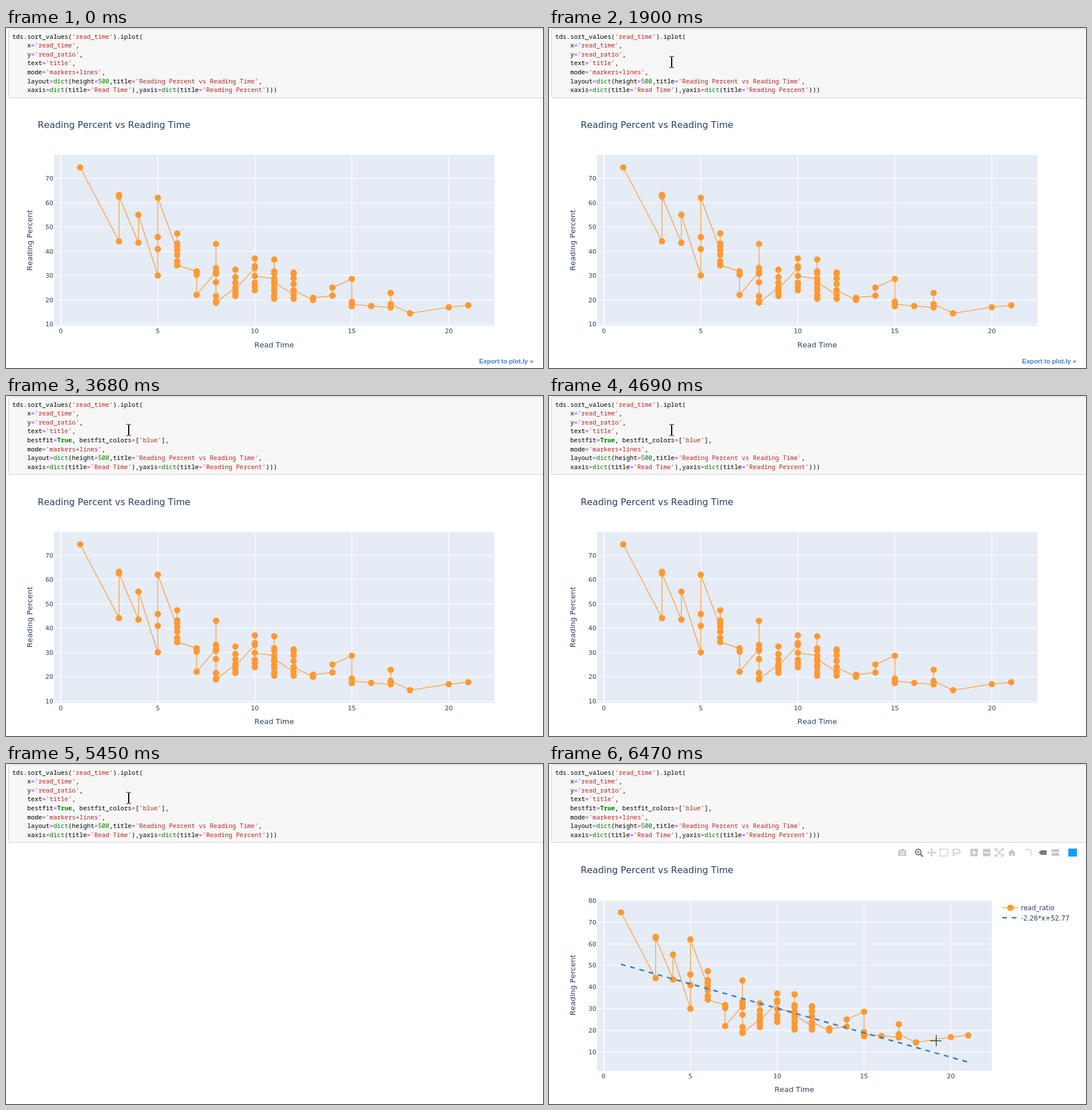
An HTML page with a canvas that plays this animation: 941x595 px, repeating every 6.55 s.

```html
<!DOCTYPE html>
<html lang="en">
<head>
<meta charset="utf-8">
<title>Notebook chart</title>
<style>
html, body { margin: 0; width: 100%; height: 100%; overflow: hidden; background: #fff; }
canvas { display: block; }
</style>
</head>
<body>
<canvas id="stage" width="941" height="595"></canvas>
<script>
const c = document.getElementById('stage').getContext('2d');
const LOOP = 6550, SHIFT = 15.5, LINE = 15.56;
const SANS = '"DejaVu Sans", Verdana, sans-serif';
const ARIAL = '"Liberation Sans", Arial, sans-serif';
const MONO = '"Noto Sans Mono", "Liberation Mono", monospace';
const INK = '#2a3f5f', ORANGE = '#ff9933', BLUE = '#3780bf', PLOT = '#e5ecf6';
c.fontKerning = 'none';

// read time -> reading percents, in drawing order
const data = {
  1: [74.5], 3: [44.1, 63.2, 62.5], 4: [43.5, 55], 5: [30, 40.9, 45.8, 62],
  6: [40.4, 47.3, 43.2, 42, 38.5, 35.9, 34.2], 7: [31.7, 30.3, 22],
  8: [31.4, 43, 33.1, 30.7, 27.2, 21.5, 19.3, 18.8],
  9: [25, 32.4, 29.3, 27, 23, 21.5, 24.4],
  10: [33, 37, 33.8, 27, 25.5, 23.9, 29.8],
  11: [28.6, 36.6, 31.7, 30.7, 26.5, 24.6, 23.7, 21.8, 20.4, 27.2],
  12: [22, 31.2, 30.7, 28.8, 26.5, 20.4, 23.9], 13: [19.9, 20.8],
  14: [21.7, 25], 15: [28.6, 19.2, 17.3, 18.2], 16: [17.4],
  17: [16.8, 22.8, 18.2], 18: [14.4], 20: [16.9], 21: [17.7]
};
const points = Object.entries(data).flatMap(([x, ys]) => ys.map(y => [+x, y]));

const head = ["tds.sort_values('read_time').iplot(", "    x='read_time',", "    y='read_ratio',", "    text='title',"];
const tail = ["    mode='markers+lines',",
  "    layout=dict(height=500,title='Reading Percent vs Reading Time',",
  "    xaxis=dict(title='Read Time'),yaxis=dict(title='Reading Percent')))"];
const added = "    bestfit=True, bestfit_colors=['blue'],";
const logCode = ["layout = dict(", "    xaxis=dict(type='log', title='Word Count'),",
  "    yaxis=dict(title='views'),", "    title='Views vs Word Count Log Axis')", "",
  "tds.sort_values('word_count').iplot(", "    x='word_count',", "    y='views',",
  "    layout=layout,", "    text='title',", "    mode='markers',", "    bestfit=True,",
  "    bestfit_colors=['blue'])"];

function box(x, y, w, h, color) {
  c.fillStyle = color;
  c.fillRect(x, y, w, h);
}

function write(str, x, baseline, font, color, align = 'left') {
  c.font = font;
  c.textAlign = align;
  c.fillStyle = color;
  c.fillText(str, x, baseline);
}

// chart text, vertically centred on its capitals
function label(str, x, y, size, align) {
  write(str, x, y + size * 0.365, `${size}px ${SANS}`, INK, align);
}

function dot(x, y, r = 5.6, color = ORANGE) {
  c.fillStyle = color;
  c.beginPath();
  c.arc(x, y, r, 0, 7);
  c.fill();
}

function path(pts, color, width, dash = []) {
  c.strokeStyle = color;
  c.lineWidth = width;
  c.setLineDash(dash);
  c.beginPath();
  pts.forEach(p => c.lineTo(...p));
  c.stroke();
  c.setLineDash([]);
}

const dashed = (...pts) => path(pts, BLUE, 2.7, [8.4, 8.4]);

function tokenColor(s) {
  if (s[0] === "'") return '#ba2121';
  if (s === '=') return '#aa22ff';
  return /^(dict|type|True|\d+)$/.test(s) ? '#008000' : '#000';
}

function cell(lines, top) {
  c.beginPath();
  c.roundRect(4.5, top + 0.5, 950, Math.round(lines.length * LINE + 12), 2);
  c.fillStyle = '#f7f7f7';
  c.fill();
  c.strokeStyle = '#cfcfcf';
  c.lineWidth = 1;
  c.stroke();
  lines.forEach((line, i) => {
    let x = 11;
    for (const s of line.match(/'[^']*'|\w+|=|[^\w'=]+/g) || []) {
      const weight = s === 'True' ? 'bold' : 'normal';
      write(s, x, top + 17.8 + i * LINE, `${weight} 10.9px ${MONO}`, tokenColor(s));
      x += c.measureText(s).width;
    }
  });
}

function chart(dy, fit) {
  const right = fit ? 776 : 856, top = Math.round(222 + dy), bottom = Math.round(521 + dy);
  const X = v => fit ? 95.6 + v * 30.43 : 96 + v * 34;
  const Y = v => dy + (fit ? 488.5 - (v - 10) * 3.79 : 518 - (v - 10) * 4.247);
  box(84, top, right - 84, bottom - top, PLOT);
  for (let v = 0; v <= 20; v += 5) {
    box(Math.round(X(v)) - (v ? 0.7 : 1), top, v ? 1.3 : 2, bottom - top, '#fff');
    label(v, X(v), 530 + dy, 11, 'center');
  }
  for (let v = 10; v <= (fit ? 80 : 70); v += 10) {
    box(84, Math.round(Y(v)) - 0.6, right - 84, 1.2, '#fff');
    label(v, 83, Y(v), 11, 'right');
  }
  const pts = points.map(([x, y]) => [X(x), Y(y)]);
  path(pts, ORANGE, 1.3);
  pts.forEach(p => dot(...p));
  if (fit) {
    dashed([X(1), Y(50.51)], [X(21), Y(5.31)]);
    path([[794, 251.5], [822, 251.5]], ORANGE, 1.3);
    dot(808.5, 251.5);
    label('read_ratio', 827, 251.5, 11.55);
    dashed([794, 269], [821, 269]);
    label('-2.26*x+52.77', 827, 269.5, 11.55);
  }
  label('Reading Percent vs Reading Time', 55.5, 169.5 + dy, 15.85);
  label('Read Time', (84 + right) / 2, 554 + dy, 12.95, 'center');
  c.save();
  c.translate(41.5, 371.5 + dy);
  c.rotate(-Math.PI / 2);
  label('Reading Percent', 0, 0, 12.95, 'center');
  c.restore();
  write('Export to plot.ly »', 829, 587 + dy, `bold 11.25px ${ARIAL}`, '#447adb');
}

function logSection() {
  box(0, 143, 941, 1, '#aaa');
  write('Log Scale', 9.5, 186, `bold 20.5px ${ARIAL}`, '#000');
  cell(logCode, 207);
  label('Views vs Word Count Log Axis', 55.5, 468.5, 15.85);
  box(84, 521, 684, 74, PLOT);
  for (let v = 2; v <= 15; v++) {
    const n = v < 10 ? v / 10 : v - 9;
    box(Math.round(440 + 399 * Math.log10(n)) - 0.5, 521, 1, 74, '#fff');
  }
  [['160k', 547], ['140k', 581]].forEach(([s, y]) => {
    box(84, y - 0.5, 684, 1, '#fff');
    label(s, 83, y, 11, 'right');
  });
  dot(700, 544);
  dot(800, 534.5);
  label('views', 819, 535, 11.55);
  dashed([786, 552], [812, 552]);
  label('9.81*x+9818.69', 819, 553, 11.55);
}

function modebar(y) {
  const pale = '#c7c7c7', dark = '#7c7c7c';
  const ring = (x, y, rx, ry, color, w) => {
    c.strokeStyle = color;
    c.lineWidth = w;
    c.beginPath();
    c.ellipse(x, y, rx, ry, 0, 0, 7);
    c.stroke();
  };
  const shape = (pts, color) => {
    c.fillStyle = color;
    c.beginPath();
    pts.forEach(p => c.lineTo(...p));
    c.fill();
  };
  c.save();
  c.translate(0, y);
  // camera
  box(612, -4, 14, 10, pale);
  box(616, -6, 6, 3, pale);
  dot(619, 1, 3.6, '#fff');
  dot(619, 1, 2.2, pale);
  // zoom
  ring(647, -1, 4.8, 4.8, dark, 2.2);
  path([[650, 2], [655, 7]], dark, 2.6);
  path([[644.5, -1], [649.5, -1]], dark, 1.4);
  path([[647, -3.5], [647, 1.5]], dark, 1.4);
  // pan
  path([[664, 0], [677, 0]], pale, 1.5);
  path([[670.5, -6], [670.5, 6]], pale, 1.5);
  for (let i = 0; i < 4; i++) {
    c.save();
    c.translate(670.5, 0);
    c.rotate(i * Math.PI / 2);
    shape([[7.5, 0], [4.5, -3], [4.5, 3]], pale);
    c.restore();
  }
  // box select, lasso
  c.setLineDash([2.4, 1.6]);
  c.strokeStyle = pale;
  c.lineWidth = 2;
  c.strokeRect(685.5, -6, 13, 12);
  c.setLineDash([]);
  ring(714, -2, 6.5, 4, pale, 1.7);
  path([[709, 1], [708, 4], [711, 6]], pale, 1.6);
  // zoom in, zoom out
  [745, 767].forEach((x, i) => {
    box(x - 6.5, -6.5, 13, 13, pale);
    box(x - 4, -1, 8, 2, '#fff');
    if (!i) box(x - 1, -4, 2, 8, '#fff');
  });
  // autoscale
  path([[783, -6], [795, 6]], pale, 1.6);
  path([[795, -6], [783, 6]], pale, 1.6);
  [-1, 1].forEach(a => [-1, 1].forEach(b =>
    path([[789 + a * 3, b * 6.5], [789 + a * 7, b * 6.5], [789 + a * 7, b * 3]], pale, 1.6)));
  // home
  shape([[804, 0.5], [811, -6], [818, 0.5]], pale);
  box(806, 0, 10, 6, pale);
  box(810, 2, 2.5, 4, '#f7f7f7');
  // spikes, closest, compare
  path([[835, -5], [845, -5]], pale, 1.8, [2.5, 1.5]);
  path([[845, -3], [845, 6]], pale, 1.8, [2.5, 1.5]);
  shape([[858, 0], [862, -4], [872, -4], [872, 4], [862, 4]], dark);
  [-3.2, 3.2].forEach(v => shape([[879, v], [882, v - 2.5], [894, v - 2.5], [894, v + 2.5], [882, v + 2.5]], pale));
  box(910, -7, 15, 14, '#119dff');
  c.restore();
}

function pointer(t) {
  if (t < 330) return null;
  if (t < 900) {
    const s = Math.floor((t - 330) / (570 / 7)) / 7;
    const bend = (a, b, d) => (1 - s) ** 2 * a + 2 * s * (1 - s) * b + s * s * d;
    return [bend(690, 270, 215), bend(502, -115, 58.5)];
  }
  if (t < 6000) return [215, 58.5];
  const k = Math.min(1, (Math.floor((t - 6000) / (470 / 6) + 0.001) + 1) / 7);
  const s = k * k * (3 - 2 * k);
  return [215 + 463 * s, 58.5 + 425.5 * s];
}

function drawPointer([px, py], right, dy) {
  const x = Math.round(px), y = Math.round(py);
  if (y < 123 + dy) {
    box(x - 1, y - 9, 2, 19, '#000');
    [-10, 10].forEach(end => [-4, 1].forEach(side => box(x + side, y + end, 3, 1, '#000')));
  } else if (x > 84 && x < right && y > 222 + dy && y < 521 + dy) {
    box(x - 10, y, 20, 1, '#000');
    box(x, y - 10, 1, 20, '#000');
  } else {
    c.beginPath();
    [[0, 0], [0, 16], [4, 12.5], [6.5, 18], [9, 17], [6.5, 11.5], [11.5, 11.5]]
      .forEach(([a, b]) => c.lineTo(x + a, y + b));
    c.closePath();
    c.fillStyle = '#fff';
    c.fill();
    c.strokeStyle = '#000';
    c.lineWidth = 1;
    c.stroke();
  }
}

function draw(t) {
  const within = (a, b) => t >= a && t < b;
  const dy = t < 2200 ? 0 : SHIFT, fit = t >= 5620;
  box(0, 0, 941, 595, '#fff');
  cell([...head, ...(t < 2200 ? [] : [t < 3130 ? '' : added]), ...tail], 1);

  if (within(5220, 5450)) logSection();
  else if (!within(5450, 5620)) chart(dy, fit);

  if (within(1340, 1900)) box(122, 54, 1, 16, '#000');
  if (within(2200, 2730)) box(36, 70, 1, 16, '#000');
  if (within(3130, 3680) || within(4210, 4690)) box(287, 70, 1, 16, '#000');

  // click highlight
  if (within(1050, 1340)) {
    const step = Math.min(2, Math.floor((t - 1050) / 75));
    dot(215.5, 58.5, 14, `rgba(255,255,0,${0.5 - step * 0.12})`);
  }
  const p = pointer(t);
  if (p) {
    if (p[1] > 130 + dy) modebar(139.5 + dy);
    drawPointer(p, fit ? 776 : 856, dy);
  }
}

function tick() {
  draw(performance.now() % LOOP);
  requestAnimationFrame(tick);
}
tick();
</script>
</body>
</html>
```
